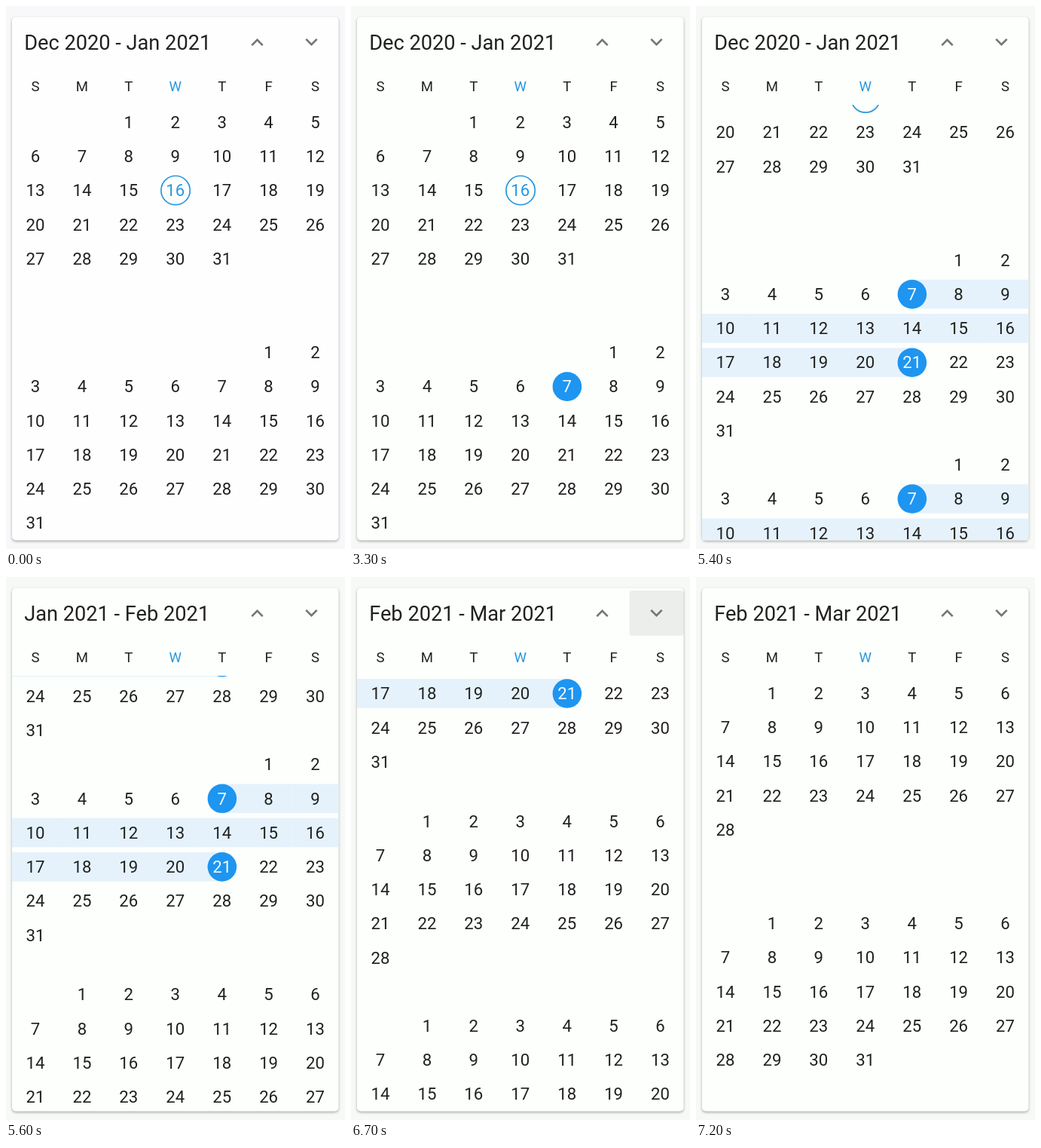
Recreate the animation shown at these times as an HTML page with a canvas. Size 450x720 px, loop 8 s.

```html
<!DOCTYPE html>
<html lang="en">
<head>
<meta charset="utf-8">
<title>Two-month range picker</title>
<style>
  html, body { margin: 0; width: 100%; height: 100%; overflow: hidden; background: #f7f9f6; }
  canvas { display: block; width: 450px; height: 720px; }
</style>
</head>
<body>
<canvas id="stage"></canvas>
<script>
const W = 450, H = 720, LOOP = 8000, STEP = 100;
const CARD = { x: 8, y: 14.5, w: 433.5, h: 694 };
const COL = CARD.w / 7, ROW = 45.27;
const ROW_TOP = 154, MONTH_GAP = 305.2, PAGE = 576.5, VIEW_TOP = 131;
const BLUE = '#1e95f0', TODAY_BLUE = '#2797df', BAND = '#e5f2fc', INK = '#212121';
const MONTHS = ['Jan', 'Feb', 'Mar', 'Apr', 'May', 'Jun', 'Jul', 'Aug', 'Sep', 'Oct', 'Nov', 'Dec'];

const canvas = document.getElementById('stage');
const ratio = window.devicePixelRatio || 1;
canvas.width = W * ratio;
canvas.height = H * ratio;
const ctx = canvas.getContext('2d', { alpha: false });
ctx.scale(ratio, ratio);

const monthAt = n => new Date(2020, 11 + n, 1);
const dayKey = (month, day) => new Date(2020, 11 + month, day).getTime();
const today = dayKey(0, 16), rangeStart = dayKey(1, 7);
const colX = c => CARD.x + (c + 0.5) * COL;
const clamp = v => Math.max(0, Math.min(1, v));
const mix = (a, b, k) => `rgb(${a.map((v, i) => Math.round(v + (b[i] - v) * k)).join()})`;

function text(str, x, y, size, color, align = 'center') {
  ctx.font = `400 ${size}px Roboto, sans-serif`;
  ctx.textAlign = align;
  ctx.fillStyle = color;
  ctx.fillText(str, x, y);
}

function roundRect(x, y, w, h, r) {
  ctx.beginPath();
  ctx.roundRect(x, y, w, h, r);
}

function circle(x, y, r) {
  ctx.beginPath();
  ctx.arc(x, y, r, 0, Math.PI * 2);
}

function chevron(x, y, dir) {
  ctx.beginPath();
  ctx.moveTo(x - 7.2, y + 4.1 * dir);
  ctx.lineTo(x, y - 3.1 * dir);
  ctx.lineTo(x + 7.2, y + 4.1 * dir);
  ctx.strokeStyle = '#757575';
  ctx.lineWidth = 2.7;
  ctx.stroke();
}

// Last selected day, or null before the first press
function rangeEnd(t) {
  if (t < 3300) return null;
  if (t < 3400) return rangeStart;
  return dayKey(1, t < 3600 ? 14 : 21);
}

// Scroll position in pages: a swipe that settles, then a button press
function scrollAt(t) {
  if (t < 5300) return 0;
  if (t <= 5500) return 0.04 + 0.41 * Math.pow((t - 5300) / 200, 1.25);
  if (t < 5900) return 1 - 0.55 * Math.exp(-(t - 5500) / 82.5);
  if (t < 6600) return 1;
  return 1 + clamp((t - 6582.5) / 500);
}

function titleAt(t) {
  const n = t < 5600 ? 0 : t < 6700 ? 1 : 2;
  return [n, n + 1].map(i => {
    const d = monthAt(i);
    return MONTHS[d.getMonth()] + ' ' + d.getFullYear();
  }).join(' - ');
}

function drawDay(key, day, col, y, end) {
  const x = colX(col), left = x - COL / 2;
  const isEdge = end !== null && (key === rangeStart || key === end);
  if (end !== null && end > rangeStart && key >= rangeStart && key <= end) {
    const from = key === rangeStart ? x : left;
    const to = key === end ? x : left + COL;
    ctx.fillStyle = BAND;
    ctx.fillRect(from, y - 19.2, to - from + (key === end ? 0 : 0.3), 38.6);
  }
  let color = INK;
  if (isEdge) {
    circle(x + 0.2, y + 0.2, 19.3);
    ctx.fillStyle = BLUE;
    ctx.fill();
    color = '#f4faff';
  } else if (key === today) {
    circle(x + 0.3, y - 0.1, 19.2);
    ctx.strokeStyle = TODAY_BLUE;
    ctx.lineWidth = 1.7;
    ctx.stroke();
    color = TODAY_BLUE;
  }
  text(day, x, y + 7.9, 22.2, color);
}

function drawMonth(n, top, end) {
  const first = monthAt(n), lead = first.getDay();
  const count = new Date(first.getFullYear(), first.getMonth() + 1, 0).getDate();
  for (let day = 1; day <= count; day++) {
    const cell = lead + day - 1;
    const y = top + Math.floor(cell / 7) * ROW;
    if (y > VIEW_TOP - 30 && y < H + 20) drawDay(dayKey(n, day), day, cell % 7, y, end);
  }
}

function draw(t) {
  const tint = clamp(t / 500);
  ctx.fillStyle = mix([248, 247, 250], [247, 249, 246], tint);
  ctx.fillRect(0, 0, W, H);

  ctx.save();
  ctx.shadowColor = 'rgba(0,0,0,0.32)';
  ctx.shadowBlur = 3.5 * ratio;
  ctx.shadowOffsetY = 1.4 * ratio;
  ctx.fillStyle = mix([254, 254, 255], [253, 255, 252], tint);
  roundRect(CARD.x, CARD.y, CARD.w, CARD.h, 5);
  ctx.fill();
  ctx.restore();

  const press = t < 6700 ? 0 : clamp(1 - (t - 6700) / 500);
  if (press > 0) {
    ctx.fillStyle = `rgba(0,0,0,${0.065 * press})`;
    roundRect(369.5, 18, 72, 60, 4);
    ctx.fill();
  }

  text(titleAt(t), 24.2, 57.6, 27.2, INK, 'left');
  chevron(333.5, 48, 1);
  chevron(405.5, 48, -1);
  [...'SMTWTFS'].forEach((s, i) => text(s, colX(i), 112.5, 18.6, i === 3 ? TODAY_BLUE : INK));

  ctx.save();
  ctx.beginPath();
  ctx.rect(CARD.x, VIEW_TOP, CARD.w, CARD.y + CARD.h - VIEW_TOP);
  ctx.clip();
  const scroll = scrollAt(t), end = rangeEnd(t);
  for (let page = 0; page < 3; page++) {
    const shift = (page - scroll) * PAGE;
    if (Math.abs(shift) >= PAGE) continue;
    drawMonth(page, ROW_TOP + shift, end);
    drawMonth(page + 1, ROW_TOP + MONTH_GAP + shift, end);
  }
  ctx.restore();
}

const begin = performance.now();
function tick() {
  const t = (performance.now() - begin) % LOOP;
  draw(Math.floor(t / STEP) * STEP);
  requestAnimationFrame(tick);
}
tick();
</script>
</body>
</html>
```
